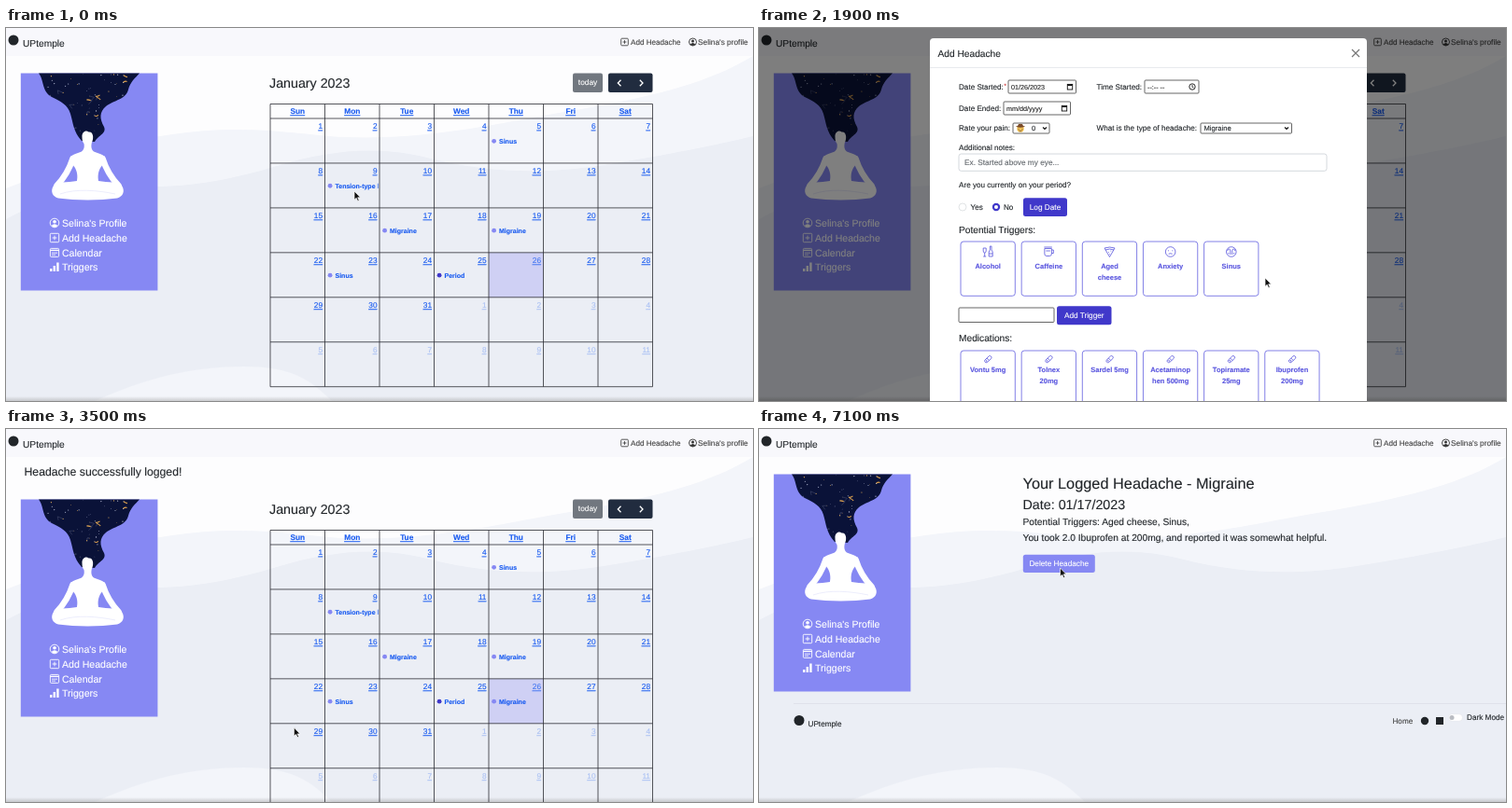
Animation, 800 px wide and 400 px high, one loop 7.2 s. Source, as an HTML page:

```html
<!DOCTYPE html>
<html lang="en">
<head>
<meta charset="utf-8">
<style>
html, body { margin: 0; width: 100%; height: 100%; overflow: hidden; background: #fff; }
svg { display: block; }
text { font-family: "Liberation Sans", Arial, sans-serif; white-space: pre; text-rendering: geometricPrecision; stroke-width: .12px; }
</style>
</head>
<body>
<svg id="stage" width="800" height="400" viewBox="0 0 800 400"></svg>
<script>
const INK = '#212529', LINK = '#1558f0', LILAC = '#8688f3', INDIGO = '#4038ca', GREY = '#6c757d';
const APP = 'UPtemple', USER = "Selina's";
const LOOP = 7200, SHIFT = 27, SCROLL = 167;
const BOLD = 'font-weight="bold"', MID = 'text-anchor="middle"', END = 'text-anchor="end"';

// y is the middle of the capitals
const text = (x, y, s, size = 8.15, fill = INK, more = '') =>
  `<text x="${x}" y="${y + size * .36}" font-size="${size}" fill="${fill}" stroke="${fill}" ${more}>${s}</text>`;
const rect = (x, y, w, h, fill, more = '') =>
  `<rect x="${x}" y="${y}" width="${w}" height="${h}" fill="${fill}" ${more}/>`;
const box = (x, y, w, h, stroke, more = '') =>
  rect(x, y, w, h, 'none', `stroke="${stroke}" stroke-width=".9" ${more}`);
const circle = (x, y, r, fill, more = '') => `<circle cx="${x}" cy="${y}" r="${r}" fill="${fill}" ${more}/>`;
const shape = (d, fill, more = '') => `<path d="${d}" fill="${fill}" ${more}/>`;
const line = (d, stroke, w = .9, more = '') =>
  `<path d="${d}" fill="none" stroke="${stroke}" stroke-width="${w}" ${more}/>`;
const group = (id, body, more = '') => `<g id="${id}" ${more}>${body}</g>`;
const at = (x, y, body) => `<g transform="translate(${x} ${y})">${body}</g>`;
const button = (x, y, w, h, label, fill, id = '') =>
  rect(x, y, w, h, fill, `rx="2.5" id="${id}"`) + text(x + w / 2, y + h / 2, label, 8.25, '#fff', MID);

const plusBox = (x, y, r, c) => at(x, y, box(-r, -r, 2 * r, 2 * r, c, 'rx="1"') +
  line(`M${-r / 2} 0H${r / 2}M0 ${-r / 2}V${r / 2}`, c));
const person = (x, y, r, c) => at(x, y, circle(0, 0, r, 'none', `stroke="${c}" stroke-width=".9"`) +
  circle(0, -r * .25, r * .38, c) + shape(`M${-r * .7} ${r * .65}Q0 ${-r * .1} ${r * .7} ${r * .65}Q0 ${r * 1.3} ${-r * .7} ${r * .65}`, c));

function background() {
  return rect(0, 0, 800, 400, '#fdfdfe') +
    shape('M0 172C60 150 110 124 165 116C240 104 285 110 345 116C430 122 500 108 570 95C670 78 740 66 800 30V400H0Z', '#f3f5fa') +
    shape('M0 205C60 172 110 171 165 170C210 169 250 160 290 148C350 130 400 126 455 140C510 154 570 158 640 147C700 137 750 128 800 116V400H0Z', '#ebeef5') +
    shape('M95 400C140 380 190 363 255 363C310 363 328 380 349 400Z', '#f3f5fa') +
    rect(0, 395, 800, 5, 'url(#shade)');
}

function nav() {
  return rect(0, 0, 800, 30, '#f8f8fc') + circle(8, 13, 5.5, INK) +
    text(18, 16, APP, 10.2) + plusBox(662.5, 15, 3.8, '#444') + text(669, 15, 'Add Headache', 8.1, '#444') +
    person(735.5, 15, 4, '#333') + text(741, 15, USER + ' profile', 8.3, '#444');
}

function stars() {
  let seed = 11, out = '';
  const rnd = () => (seed = seed * 16807 % 2147483647) / 2147483647;
  for (let i = 0; i < 75; i++) {
    const x = 36 + rnd() * 107, y = 49 + rnd() * 66;
    out += circle(x, y, .25 + rnd() * .4, i % 3 ? '#b9bfd8' : '#e0ad58');
    if (i % 6 == 0) out += line(`M${x} ${y}l${rnd() * 12 - 6} ${rnd() * 8 - 4}l${rnd() * 10 - 5} 4`, '#6b7392', .35);
    if (i % 8 == 0) out += line(`M${x} ${y}q2 ${rnd() * 4 - 2} 4 ${rnd() * 6 - 3}`, '#dfa24c', 1.1);
  }
  return out;
}

function figure() {
  return shape('M81.5 117C81 111 86 109 88.5 111.5C93 110.5 94.5 117 92 122.5C91 126 91 130 94 132.5C99 135 106 135 107 142L101 150C98 156 98 161 100 168H75C77 161 77 156 74 150L68 142C69 135 76 135 81 132.5C84 130 84 127 83.5 124C82 122 81.5 120 81.5 117Z', '#fff') +
    line('M71.5 140C68 151 63 160 54.5 169M103.5 140C107 151 112 160 120.5 169', '#fff', 6.5, 'stroke-linecap="round"') +
    shape('M76 164C66 166 54 164 51 169C47 175 50 181 56 182.5C75 185 100 185 119 182.5C125 181 128 175 124 169C121 164 109 166 99 164Z', '#fff') +
    line('M58 178C75 172 98 174 117 178', '#d9daf9', .5);
}

function panel() {
  const hair = 'M35 48.5C41 56 38 68 49 74C59 79 66 82 69 92C72 102 72 111 81 121L95 122C99 115 108 113 105 106C100 97 100 90 107 84C116 77 128 77 131 66C133 58 138 54 143 48.5Z';
  const menu = [USER + ' Profile', 'Add Headache', 'Calendar', 'Triggers'];
  return rect(15.8, 48.5, 146.6, 233, LILAC) + shape(hair, '#0a1238') +
    `<g clip-path="url(#hair)">${stars()}</g><clipPath id="hair">${shape(hair, '#000')}</clipPath>` + figure() +
    menu.map((s, i) => text(60, 209 + 15.9 * i, s, 10.55, '#fff')).join('') +
    person(52, 209, 4.8, '#fff') + plusBox(52, 225, 4.7, '#fff') +
    box(47.4, 236.4, 9.2, 9, '#fff', 'rx="1"') + line('M47.5 238.4H56.5', '#fff', 1.3) +
    line('M49 241.2H55M49 243.2H53', '#fff', .8) +
    rect(47, 258, 2.4, 3, '#fff') + rect(50.6, 255, 2.4, 6, '#fff') + rect(54.2, 251.5, 2.4, 9.5, '#fff');
}

const COL = 58.5, ROW = 47.95, LEFT = 283, TOP = 97;
const cell = day => [LEFT + (day - 1) % 7 * COL, TOP + Math.floor((day - 1) / 7) * ROW];

function event(day, name, dot = LILAC) {
  const [x, y] = cell(day);
  return `<svg x="${x}" y="${y}" width="57" height="40">` + circle(5.6, 24.3, 2.4, dot) +
    text(11, 24.2, name, 7, LINK, BOLD) + '</svg>';
}

function tip(id, day) {
  const [x, y] = cell(day), mid = x + COL / 2;
  return group(id, rect(x + 1.5, y + 18.5, 56, 12, '#000', 'opacity=".12" rx="1.5"') +
    rect(mid - 34, y - 3.6, 68, 21.5, LILAC) + text(mid, y + 7.2, 'Type: Migraine', 7.6, '#fff', BOLD + ' ' + MID) +
    shape(`M${mid - .5} ${y + 14}h6l-3 3.5Z`, '#26284a'));
}

function calendar() {
  const [tx, ty] = cell(26);
  let out = text(282, 59, 'January 2023', 14.25) +
    rect(607, 48.5, 32, 20.5, '#71777f', 'rx="2"') + text(623, 58.5, 'today', 8.3, '#fff', MID) +
    rect(645, 48.5, 47.5, 20.5, '#212c3f', 'rx="2"') +
    line('M658.5 55.7L655.3 59L658.5 62.3M678.8 55.7L682 59L678.8 62.3', '#fff', 1.3) +
    rect(tx, ty, COL, ROW, '#cfd0f4') + rect(tx, ty, COL, ROW, '#bdd1f5', 'id="picked"');
  ['Sun', 'Mon', 'Tue', 'Wed', 'Thu', 'Fri', 'Sat'].forEach((s, i) =>
    out += text(LEFT + COL * (i + .5), 89.3, s, 8.3, LINK, `${BOLD} ${MID} text-decoration="underline"`));
  for (let d = 1; d <= 42; d++) {
    const [x, y] = cell(d), next = d > 31;
    out += text(x + COL - 2.5, y + 8.5, next ? d - 31 : d, 8.3, LINK,
      `${END} text-decoration="underline" opacity="${next ? .3 : d == 26 ? .75 : 1}"`);
  }
  let grid = `M${LEFT} 81.5H692.5`;
  for (let i = 0; i < 7; i++) grid += `M${LEFT} ${TOP + i * ROW}H692.5`;
  for (let i = 0; i < 8; i++) grid += `M${LEFT + i * COL} 81.5V384.7`;
  out += line(grid, '#2b2d33', .8);
  out += event(5, 'Sinus') + event(9, 'Tension-type headache') + event(17, 'Migraine') +
    event(19, 'Migraine') + event(23, 'Sinus') + event(25, 'Period', INDIGO);
  return out + group('logged', event(26, 'Migraine')) + tip('tip26', 26) + tip('tip17', 17);
}

const icons = {
  bottle: 'M-5 -4h3v3q0 2 -1.5 2t-1.5 -2ZM-3.5 1V5M-5 5h3M1 5V0l1.2 -2V-6h1.6V-2L5 0V5ZM1 2h4',
  cup: 'M-4.5 -3.5H3V2q0 2.5 -2 2.5H-2.5q-2 0 -2 -2.5ZM3 -2h2v3.5H3M-5 -5H3.5M-3 -1h4.5',
  pizza: 'M-5.5 -4Q0 -6 5.5 -4L0 5.5ZM-4.5 -2Q0 -4 4.5 -2M-1 0v.8M1.3 -1.3v.8M0 2.3v.7',
  face: 'M-5.3 0a5.3 5.3 0 1 0 10.6 0a5.3 5.3 0 1 0 -10.6 0M-2.2 -1.7v1M2.2 -1.7v1M-2 2.3Q0 1.2 2 2.3',
  sinus: 'M-5.3 0a5.3 5.3 0 1 0 10.6 0a5.3 5.3 0 1 0 -10.6 0M-1 3V-1q0 -2 -1.5 -2t-1.5 2M1 3V-1q0 -2 1.5 -2t1.5 2M-3 1v1.5M3 1v1.5',
  pill: 'M-3.4 1.2L1 -3.1a1.8 1.8 0 0 1 2.5 2.5L-1 3.6a1.8 1.8 0 0 1 -2.4 -2.4M-1.2 -1L1.2 1.5M-2.4 1.5l1.2 1.2M-2 1l1.3 1.2',
  jar: 'M-2.8 -3.8H2.8M-2.2 -3.2V3.8H2.2V-3.2M-2 0L2 -2M-1 2.4H1M-2 -1.7H2'
};

function card(i, y, icon, iconY, textY, label) {
  const x = 216 + 65.15 * i;
  return box(x, y, 58.3, 58.3, '#7472e4', 'rx="3"') + at(x + 29.2, iconY, line(icons[icon], '#5753dc', .8)) +
    label.split('|').map((s, k) => text(x + 29.2, textY + 12 * k, s, 7.5, '#5a56df', BOLD + ' ' + MID)).join('');
}

function modal() {
  const caret = (x, y) => line(`M${x - 2} ${y - 1}l2 2l2 -2`, '#111', 1.1);
  const field = (x, y, w, h, s) => box(x, y, w, h, '#555', 'rx="1"') + text(x + 3, y + h / 2, s, 7.2, '#222');
  const dateIcon = (x, y) => box(x - 2.7, y - 2.6, 5.4, 5.6, '#111') + line(`M${x - 2.7} ${y - 1.8}h5.4`, '#111', 1.6);
  const triggers = [['bottle', 'Alcohol'], ['cup', 'Caffeine'], ['pizza', 'Aged|cheese'], ['face', 'Anxiety'], ['sinus', 'Sinus']];
  const meds = ['Vontu 5mg', 'Tolnex|20mg', 'Sardel 5mg', 'Acetaminop|hen 500mg', 'Topiramate|25mg', 'Ibuprofen|200mg',
    'Sumatriptan|3mg', 'Benudor|70ml', 'Ondrily|50mg'];
  return rect(183, 11, 468, 544, '#fff', 'rx="4"') + text(191.5, 27, 'Add Headache', 10.2) +
    line('M635 23L643 31M643 23L635 31', '#777', 1.2) + line('M183 42.5H651M183 518H651', '#e3e5e9', .8) +
    text(214, 62.7, 'Date Started:') + text(262.5, 61.5, '*', 6, '#c33') + field(267, 56, 72.5, 14, '01/26/2023') + dateIcon(333, 63) +
    text(361.5, 62.7, 'Time Started:') + field(413, 56, 58, 14, '--:-- --') +
    circle(464, 63, 3.2, 'none', 'stroke="#111" stroke-width=".9"') + line('M464 61V63.2L465.5 64', '#111', .8) +
    text(214, 85.7, 'Date Ended:') + field(262, 79, 71.5, 14, 'mm/dd/yyyy') + dateIcon(327, 86) +
    text(214, 107.3, 'Rate your pain:') + box(272, 102, 39, 11, '#555', 'rx="1"') +
    circle(280, 108, 3.7, '#efbf55') + shape('M274.8 105.5Q280 108 285.2 105.5L283 105Q282 102 280 103Q278 102 277 105Z', '#7a4a28') +
    line('M278 108v1M282 108v1M278.3 110Q280 111.2 281.7 110', '#5b3a1c', .6) +
    text(292, 107.5, '0', 7.5) + caret(306, 107.5) +
    text(361.5, 107.3, 'What is the type of headache:') + box(473, 102, 97.5, 11, '#555', 'rx="1"') +
    text(476.5, 107.5, 'Migraine', 7.6) + caret(565, 107.5) +
    text(214, 128, 'Additional notes:') + box(214, 135, 394, 18.3, '#d0d4da', 'rx="2.5"') +
    text(220, 144, 'Ex. Started above my eye...', 8.25, '#63686d') +
    text(214, 168, 'Are you currently on your period?') +
    circle(218, 192, 4, '#fff', 'stroke="#d5d8dc" stroke-width=".7"') + text(226.5, 192, 'Yes') +
    circle(254, 192, 4.2, INDIGO) + circle(254, 192, 2, '#fff') + text(262, 192, 'No') +
    button(283, 182.3, 47, 19.7, 'Log Date', INDIGO) +
    text(214, 216.3, 'Potential Triggers:', 10.2) +
    triggers.map(([icon, s], i) => card(i, 229, icon, 240, 255.5, s)).join('') +
    box(214, 300, 102, 15.5, '#555', 'rx="1"') + button(319, 298.3, 58.5, 20, 'Add Trigger', INDIGO) +
    text(214, 332.7, 'Medications:', 10.2) +
    meds.map((s, i) => i < 6 ? card(i, 346, 'pill', 355, 366.3, s)
      : card(i - 6, 409, i < 8 ? 'jar' : 'pill', 418, 429.5, s)).join('') +
    button(214, 477.3, 34, 19.7, 'Close', GREY) + button(251, 477.3, 66, 19.7, 'Log Headache', INDIGO, 'log') +
    text(639, 536.5, '*required field', 8.25, INK, END);
}

function detail() {
  return text(282.5, 58.5, 'Your Logged Headache - Migraine', 16.33) + text(282.5, 81, 'Date: 01/17/2023', 14.3) +
    text(282.5, 99.5, 'Potential Triggers: Aged cheese, Sinus,', 10.22) +
    text(282.5, 116, 'You took 2.0 Ibuprofen at 200mg, and reported it was somewhat helpful.', 10.22) +
    button(282.8, 134.8, 77, 19.2, 'Delete Headache', INDIGO, 'delete') +
    line('M37 294.5H800', '#dcdfe7', .8) + circle(43, 312.5, 5.5, INK) + text(52.5, 316, APP, 8.2) +
    text(678.5, 313, 'Home', 8.15, '#444') + circle(713, 313, 4.2, INK) + rect(725, 309, 8, 8, INK) +
    rect(738.5, 305.7, 15, 7.6, '#fff', 'rx="3.8" stroke="#dfe1e6" stroke-width=".5"') + circle(742, 309.5, 2.5, '#b9bcc2') +
    text(758, 309, 'Dark Mode', 8.2);
}

const stage = document.getElementById('stage');
stage.innerHTML = `<linearGradient id="shade" x2="0" y2="1"><stop stop-color="#999" stop-opacity="0"/><stop offset="1" stop-color="#999" stop-opacity=".45"/></linearGradient>` +
  background() + nav() +
  group('message', text(19.5, 46, 'Headache successfully logged!', 12.25)) +
  group('panel', panel()) + group('calendar', calendar()) + group('detail', detail()) +
  group('overlay', rect(0, 0, 800, 400, '#000', 'opacity=".5"') + group('modal', modal())) +
  group('arrow', shape('M0 0V9.2L2.2 7.3L3.7 10.6L5.2 9.9L3.7 6.8H6.6Z', '#111', 'stroke="#fff" stroke-width=".7"')) +
  group('hand', shape('M-.9 .8Q0 -.6 .9 .8V4L4.6 5Q5.4 5.3 5.1 7L4.4 10H-1L-3.6 6.6Q-3.4 5.2 -2 5.8L-.9 6.8Z', '#fff', 'stroke="#111" stroke-width=".8"'));

const el = {};
stage.querySelectorAll('[id]').forEach(n => { if (n.id) el[n.id] = n; });

const clamp = v => Math.max(0, Math.min(1, v));
const ease = v => v * v * (3 - 2 * v);
const span = (t, a, b) => clamp((t - a) / (b - a));
const show = (id, on) => el[id].style.display = on ? '' : 'none';
const move = (id, x, y) => el[id].setAttribute('transform', `translate(${x} ${y})`);
const mix = (a, b, k) => `rgb(${a.map((v, i) => Math.round(v + (b[i] - v) * k))})`;
const hover = k => mix([64, 56, 202], [134, 136, 243], k);

// time, x, y of the pointer
const route = [[0, 373, 175], [300, 373, 175], [1500, 542, 268], [2200, 542, 268], [3000, 296, 333],
  [3200, 290, 322], [3400, 290, 322], [4000, 533.5, 297], [4300, 533.5, 297], [4750, 425, 244],
  [5050, 425, 244], [5400, 428, 186], [5600, 364, 168], [6000, 322.5, 149], [LOOP, 322.5, 149]];

function pointer(t) {
  const i = route.findIndex(p => p[0] > t), [a, x, y] = route[i - 1], [b, u, v] = route[i];
  const k = ease(span(t, a, b));
  return [x + (u - x) * k, y + (v - y) * k];
}

function draw(t) {
  const open = t >= 1750 && t < 3300, logged = t >= 3300 && t < 5050, detailed = t >= 5050;
  const shift = logged ? SHIFT : 0;
  const tip26 = t >= 3920 && t < 4430, tip17 = t >= 4640 && t < 5050;
  show('message', logged);
  show('logged', logged);
  show('calendar', !detailed);
  show('detail', detailed);
  show('picked', t >= 1650 && t < 3300);
  show('tip26', tip26);
  show('tip17', tip17);
  move('panel', 0, shift);
  move('calendar', 0, shift);

  show('overlay', open);
  el.overlay.setAttribute('opacity', span(t, 1750, 1900));
  move('modal', 0, -SCROLL * ease(span(t, 2250, 2900)));
  el.log.setAttribute('fill', hover(.4 + .6 * span(t, 3000, 3100)));
  el.delete.setAttribute('fill', hover(span(t, 5780, 5930)));

  const [x, y] = pointer(t), hand = tip26 || tip17;
  show('hand', hand);
  show('arrow', !hand);
  move('hand', x, y);
  move('arrow', x, y);
}

const start = performance.now();
function tick() {
  draw((performance.now() - start) % LOOP);
  requestAnimationFrame(tick);
}
tick();
</script>
</body>
</html>
```
